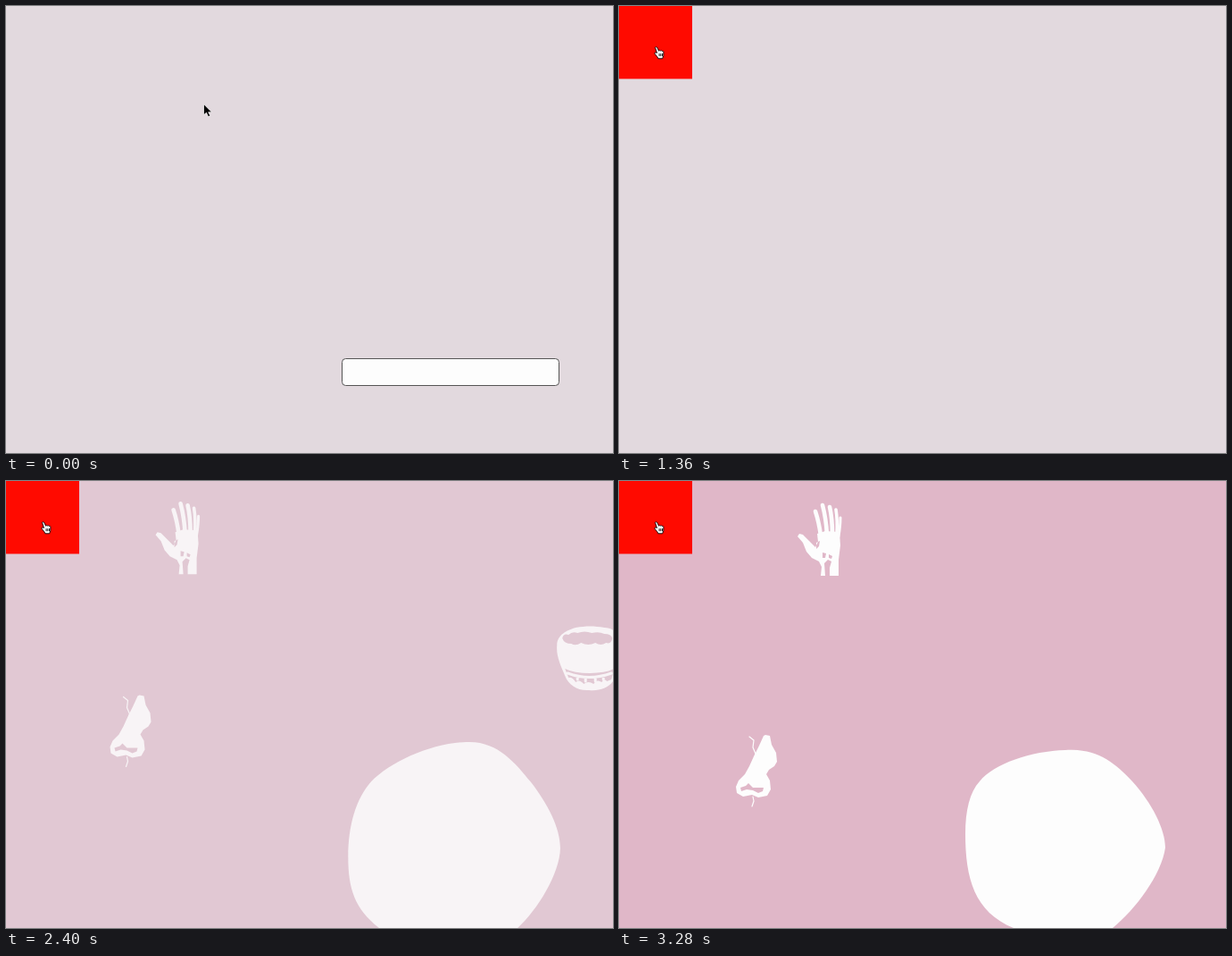
Recreate the animation shown at these times as an HTML page. Size 680 by 500 pixels, loop 3.36 s.

```html
<!DOCTYPE html>
<html lang="en">
<head>
<meta charset="utf-8">
<title>Senses</title>
<style>
  html, body { margin: 0; width: 100%; height: 100%; overflow: hidden; }
  svg { display: block; width: 680px; height: 500px; }
  .part { fill: #fdfdfd; fill-rule: evenodd; }
  .part .line { fill: none; stroke: #fdfdfd; stroke-linecap: round; stroke-linejoin: round; }
</style>
</head>
<body>
<svg id="stage" viewBox="0 0 680 500">
  <rect id="back" width="680" height="500"/>
  <rect id="field" x="376.5" y="394.5" width="243" height="30" rx="4" fill="#fdfdfd" stroke="#555"/>

  <path id="blob" class="part"/>

  <g id="hand" class="part">
    <path d="M22 35L31 32L47 33L48 48L46 64L46 82H36L36 73L38 66L34 64L30 68L31 82H26L27 72L24 66L16 62L10 55L6 45L0 38L2 35L6 36L13 43L20 50L23 44Z
      M21 45L25 43L24 49L21 52Z M28 56L32 57L31 62L28 62Z M35 58L39 60L38 63L35 62Z"/>
    <g class="line" stroke-width="4.6">
      <path d="M20 10Q24 22 26 37"/>
      <path d="M28 3Q32 18 33 36"/>
      <path d="M36 5Q39 18 39 36"/>
      <path d="M43 8Q45 20 44 36" stroke-width="3.6"/>
      <path d="M48 17Q48 26 46 38" stroke-width="3"/>
    </g>
  </g>

  <g id="nose" class="part">
    <path d="M33 1L38 2L40 12L45 21L46 31L43 36L37 40L34 45L38 52L39 62L35 69L25 71L18 68L8 70L1 66L0 59L3 52L10 45L15 36L20 25L26 13L31 2Z
      M5 60L11 58L14 55L19 60L31 60L30 64L25 66L19 63L12 62L6 64Z"/>
    <path class="line" d="M15 3L20 7L19 15L22 22L20 30M19 70L20 75L18 81" stroke-width="1.2"/>
  </g>

  <g id="eye" class="part">
    <path d="M0 30L10 27C24 25 28 12 44 6L56 3L60 1L65 3L71 0L75 3L81 2L82 6L88 8L86 14L89 20L84 24L87 32L80 38L74 41C78 30 78 20 70 15C58 10 46 14 38 21C30 30 26 33 16 35L32 46L28 48L6 37Z"/>
    <g class="line">
      <circle cx="64" cy="27" r="10" stroke-width="3"/>
      <path d="M62 20Q70 22 68 32" stroke-width="4"/>
      <path d="M30 47Q48 54 74 41" stroke-width="3"/>
    </g>
    <path id="lashes" fill="none" stroke-width="1.2" stroke-dasharray="2 3" d="M28 21Q44 8 68 8"/>
  </g>

  <g id="mouth" class="part">
    <path d="M1 22C1 10 12 5 22 2C34 0 42 0 54 2C66 2 73 12 73 22C73 34 69 50 65 60C60 70 48 73 37 72C24 73 14 66 10 56C5 44 0 34 1 22Z
      M7 14Q8 8 14 10Q18 6 24 8Q32 5 40 8Q48 6 54 9Q62 9 63 14Q62 21 56 19Q50 23 44 19Q36 23 28 19Q22 23 17 20Q9 20 7 14Z
      M10 48Q20 53 38 53Q56 53 65 48L62 60L57 62Q54 58 51 63Q46 59 42 65Q36 61 31 65Q26 59 22 63Q18 57 14 58Z"/>
    <path class="line" d="M13 53Q37 62 62 53M24 56V60M33 58V62M44 58V62M53 56V60" stroke-width="3"/>
  </g>

  <g id="ear" class="part">
    <path d="M19 9C30 4 44 5 51 13C46 18 38 15 32 20C26 27 29 32 36 33L41 37C38 46 31 47 26 47C20 52 14 47 14 40C12 28 14 16 19 9Z
      M32 50L37 45L38 56L34 70L29 66Z M48 18L54 26L53 54L47 73L40 76L46 58Z"/>
    <g class="line" stroke-width="1.4">
      <path d="M11 50C-3 36 -1 6 16 1L32 3C46 3 54 10 56 22C57 44 54 64 48 76Q42 80 34 76L28 66L13 52"/>
      <path d="M14 46C4 34 4 12 17 6"/>
      <path d="M41 22Q48 34 42 52L38 66"/>
    </g>
  </g>

  <rect id="red" width="82" height="81.5" fill="#ff0a00"/>

  <g id="cursor">
    <path id="arrow" d="M0 0V12L3 9.5L5 14L7.3 13L5.2 9H9Z" fill="#000" stroke="#fff" stroke-width=".7"/>
    <path id="pointer" d="M1 1.6Q2.2 .2 3.4 1.8L5 5.4Q6.3 4.3 7.1 5.3Q8.3 4.6 8.9 5.7Q10.2 5.3 10.4 6.8L10.3 10.6L9.2 14H4.4L3.4 12L.6 8.6Q.1 7.2 1.6 7L3 7.7Z
      M5.6 8.4V11.4M7.3 8.4V11.4M9 8.4V11.4" fill="#fff" stroke="#000" stroke-width=".9"/>
  </g>
</svg>

<script>
const LOOP = 3360, STEP = 80;
const $ = id => document.getElementById(id);
const clamp = x => Math.min(1, Math.max(0, x));
const mix = (a, b, p) => a + (b - a) * p;
const span = (t, from, to) => clamp((t - from) / (to - from));

function bezier(x1, y1, x2, y2) {
  const at = (a, b, u) => 3 * a * u * (1 - u) ** 2 + 3 * b * u * u * (1 - u) + u ** 3;
  return x => {
    let lo = 0, hi = 1;
    for (let i = 0; i < 24; i++) {
      const mid = (lo + hi) / 2;
      if (at(x1, x2, mid) < x) lo = mid; else hi = mid;
    }
    return at(y1, y2, (lo + hi) / 2);
  };
}
const ease = bezier(.25, .1, .25, 1);
const easeInOut = bezier(.42, 0, .58, 1);

// Each part flies out of the button, then drifts.
const parts = [
  { id: 'hand', from: [39, 29], to: [193, 21], drift: [7, 3] },
  { id: 'nose', from: [33, -7], to: [133, 287], drift: [-2, -4] },
  { id: 'eye', from: [5, 10], to: [125, 696], drift: [0, 0] },
  { id: 'mouth', from: [5, 10], to: [737, 192], drift: [0, 0] },
  { id: 'ear', from: [15, 10], to: [843, 588], drift: [0, 0] }
];

const blobStart = [518, 293, 552, 291, 572, 318, 588, 338, 606, 362, 620, 388, 620, 411,
  620, 440, 594, 482, 573, 500, 545, 522, 445, 522, 418, 500,
  392, 478, 385, 458, 385, 425, 385, 390, 394, 358, 412, 338, 434, 316, 480, 294, 518, 293];
const blobEnd = [500, 301, 536, 299, 555, 315, 575, 336, 597, 360, 612, 390, 612, 410,
  608, 440, 578, 480, 553, 500, 530, 517, 465, 517, 442, 500,
  398, 482, 388, 444, 388, 395, 388, 368, 393, 348, 404, 336, 420, 316, 462, 302, 500, 301];

function blobPath(t) {
  const p = (t - 2240) / 1040;
  const size = 1 + .04 * Math.sin(Math.PI * p);
  const centre = [501, 410];
  const n = blobStart.map((v, i) => {
    const c = centre[i % 2];
    return (c + (mix(v, blobEnd[i], p) - c) * size).toFixed(2);
  });
  return `M${n[0]} ${n[1]}C${n.slice(2).join(' ')}Z`;
}

function place(id, x, y) {
  $(id).setAttribute('transform', `translate(${x.toFixed(2)} ${y.toFixed(2)})`);
}
function show(id, on) {
  $(id).style.display = on ? '' : 'none';
}

function draw(t) {
  const tint = easeInOut(span(t, 1900, 2900));
  const back = `rgb(${[[226, 224], [217, 183], [222, 200]].map(([a, b]) => Math.round(mix(a, b, tint)))})`;
  $('back').setAttribute('fill', back);
  $('lashes').setAttribute('stroke', back);

  show('field', t < 1360);
  $('red').setAttribute('width', 82 * span(t, 180, 535));

  const open = t >= 2000;
  const fly = ease(span(t, 1865, 2865));
  const drift = span(t, 2880, 3280);
  show('blob', open);
  $('blob').setAttribute('d', blobPath(t));
  $('blob').setAttribute('opacity', fly);
  for (const { id, from, to, drift: d } of parts) {
    show(id, open);
    $(id).setAttribute('opacity', fly);
    place(id, mix(from[0], to[0], fly) + d[0] * drift, mix(from[1], to[1], fly) + d[1] * drift);
  }

  const move = easeInOut(span(t, 40, 440));
  const nudge = t < 1360 ? 1 : 0;
  const onButton = t >= 360;
  show('arrow', !onButton);
  show('pointer', onButton);
  place('cursor', mix(221.5, 39.5 + nudge, move), mix(109.8, 44.8 + nudge, move));
}

const start = performance.now();
function tick() {
  const t = (performance.now() - start) % LOOP;
  draw(Math.floor(t / STEP) * STEP);
  requestAnimationFrame(tick);
}
tick();
</script>
</body>
</html>
```
